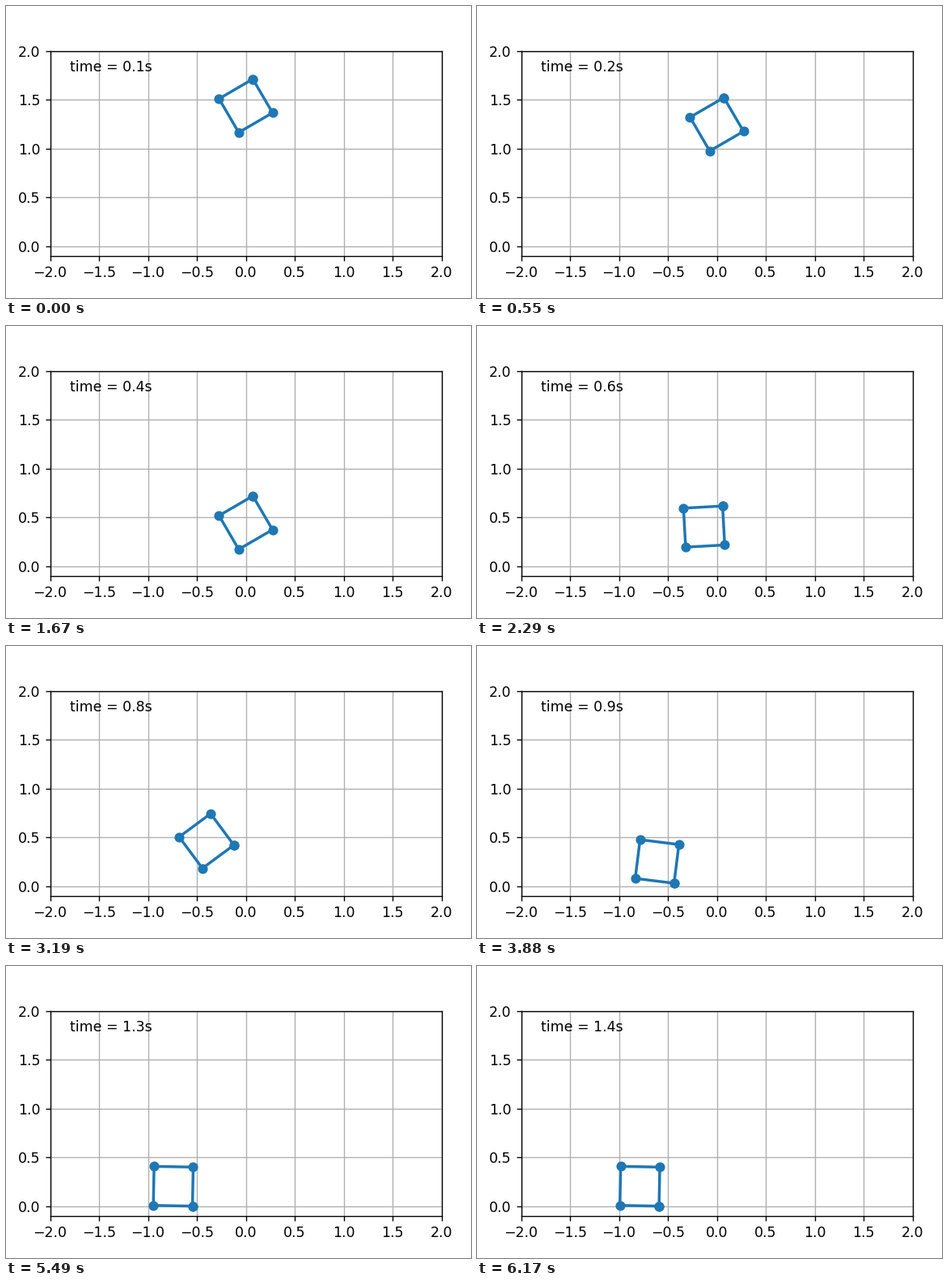
Animation, 575 px wide and 362 px high, one loop 6.24 s. Source, as a matplotlib script:

```python
import numpy as np
import matplotlib.pyplot as plt
from matplotlib.animation import FuncAnimation

W, H, DPI = 575, 362, 125
LOOP, INTERVAL = 6240, 30
STEPS = 90                 # simulation steps shown per loop
T0, DT = 0.09, 0.015
G = 9.8 * DT ** 2          # gravity per step squared
SIDE = 0.4
START = (0, 1.438, 30.2)   # x, y, angle in degrees

# free flights between impacts: length in steps, then vx, vy, spin per step
FLIGHTS = [
    (26.8, 0, -0.0149, 0),
    (29.8, -0.0209, 0.0324, -4.36),
    (13.4, -0.0058, 0.0165, 2.06),
    (8, -0.0045, 0.0023, -2.37),
    (STEPS, -0.0045, 0, 0),
]


def pose(step):
    """Follow the ballistic flights up to a step, never sinking into the floor."""
    x, y, angle = START
    for length, vx, vy, spin in FLIGHTS:
        t = min(step, length)
        x += vx * t
        y += vy * t - G / 2 * t ** 2
        angle += spin * t
        step -= t
        if step <= 0:
            break
    angle = np.radians(angle)
    floor = SIDE / 2 * (abs(np.cos(angle)) + abs(np.sin(angle)))
    return x, max(y, floor), angle


def square(x, y, angle):
    a = angle + np.pi / 4 + np.arange(5) * np.pi / 2
    r = SIDE / np.sqrt(2)
    return x + r * np.cos(a), y + r * np.sin(a)


plt.rcParams["font.family"] = "DejaVu Sans"
fig = plt.figure(figsize=(W / DPI, H / DPI), dpi=DPI, facecolor="white")
ax = fig.add_axes([54.5 / W, 52.2 / H, 484 / W, 254.1 / H])
ax.set(xlim=(-2, 2), ylim=(-0.1, 2))
ax.set_xticks(np.arange(-2, 2.1, 0.5))
ax.set_yticks(np.arange(0, 2.1, 0.5))
ax.grid()
body, = ax.plot([], [], "o-", lw=2, color="C0")
label = ax.text(0.05, 0.9, "", transform=ax.transAxes)


def update(n):
    ms = n * INTERVAL + 33
    step = min(int(ms * STEPS / LOOP), STEPS - 1)
    body.set_data(*square(*pose(step)))
    label.set_text(f"time = {T0 + DT * step:.1f}s")
    return body, label


anim = FuncAnimation(fig, update, frames=LOOP // INTERVAL, interval=INTERVAL,
                     repeat=True, repeat_delay=0)
plt.show()
```
